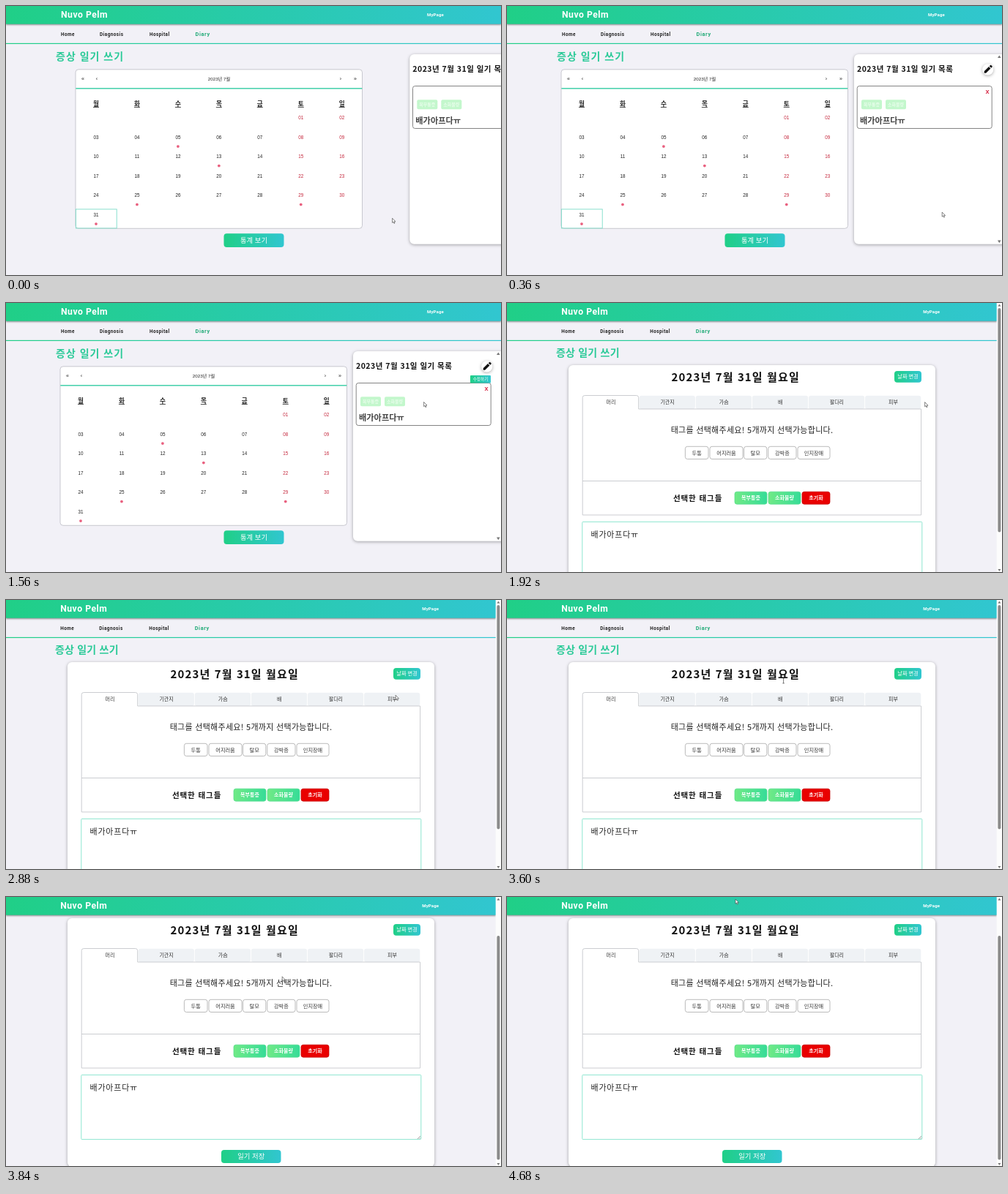
Write an HTML page that moves like this. It is 676 by 368 pixels and loops after 4.8 s.

```html
<!DOCTYPE html>
<html lang="ko">
<head>
<meta charset="utf-8">
<style>
html, body { margin: 0; width: 100%; height: 100%; overflow: hidden; background: #f2f1f7 }
svg { display: block; font-family: "Noto Sans CJK KR", "Noto Sans CJK", sans-serif }
.latin { font-family: Roboto, sans-serif; font-weight: 700 }
.num { font-family: "Liberation Sans", "Noto Sans CJK KR", sans-serif }
.b { font-weight: 700 }
.shadow { filter: drop-shadow(0 1px 2px #0005) }
.bar { filter: drop-shadow(0 1px 1px #0007) }
</style>
</head>
<body>
<svg id="stage" width="676" height="368" viewBox="0 0 676 368"></svg>
<script>
const LOOP = 4800, STEP = 120, SWITCH = 1920;
const $ = id => document.getElementById(id);

const rect = (x, y, w, h, fill, r = 0, more = '') =>
  `<rect x="${x}" y="${y}" width="${w}" height="${h}" rx="${r}" fill="${fill}" ${more}/>`;
const path = (d, more) => `<path d="${d}" ${more}/>`;
const text = (x, y, s, size, fill = '#222', more = '', gap = 0) =>
  `<text x="${x}" y="${y}" font-size="${size}" fill="${fill}" letter-spacing="${gap}" ${more}>${s}</text>`;
const mid = (x, y, s, size, fill, more = '', gap) =>
  text(x, y, s, size, fill, 'text-anchor="middle" ' + more, gap);
const group = (id, body, more = '') => `<g id="${id}" ${more}>${body}</g>`;
const button = (x, y, w, h, s, size, r = 4) =>
  rect(x, y, w, h, 'url(#brand)', r) + mid(x + w / 2, y + h / 2 + size * .36, s, size, '#fff');
const LATIN = 'class="latin"', BOLD = 'class="b"', NUM = 'class="num"';

function header(w, myPage, dx) {
  return rect(0, -4, w, 28.7, 'url(#brand)', 0, 'class="bar"') +
    text(75 + dx, 16, 'Nuvo Pelm', 12.2, '#fff', LATIN, .5) +
    text(myPage, 14.3, 'MyPage', 6, '#fff', LATIN, .15);
}

function nav(w, dx) {
  const items = [['Home', 75], ['Diagnosis', 128], ['Hospital', 196]];
  return items.map(([s, x]) => text(x + dx, 41, s, 6.4, '#222', LATIN, .45)).join('') +
    text(258.5 + dx, 41, 'Diary', 7.4, '#22ab78', LATIN, .6) +
    rect(0, 50.8, w, 1.2, 'url(#brand)');
}

// Drawn at its final place; shifted while the side panel opens.
function calendar() {
  const col = i => 102 + i * 55.95, row = i => 153 + i * 26.5;
  let s = rect(74, 86.8, 391.5, 217.5, '#fff', 4, 'stroke="#bcbcc4" stroke-width=".8"') +
    rect(74.3, 112.1, 391, 1.4, '#35cda4') +
    mid(270, 101.9, '2023년 7월', 6.2, '#222', NUM);
  [['«', 84], ['‹', 103], ['›', 436], ['»', 456]].forEach(([c, x]) => s += mid(x, 101.7, c, 7, '#222', NUM));
  [...'월화수목금토일'].forEach((c, i) => {
    s += mid(col(i), 137.2, c, 8.6, '#222', BOLD) + rect(col(i) - 4, 138.2, 8, .8, '#222');
  });
  for (let d = 1; d <= 31; d++) {
    const i = (d + 4) % 7, r = Math.floor((d + 4) / 7), x = col(i), y = row(r);
    s += mid(x, y + 2.2, String(d).padStart(2, '0'), 6.3, i > 4 ? '#c5283d' : '#222', NUM);
    if ([5, 13, 25, 29, 31].includes(d)) s += `<circle cx="${x}" cy="${y + 12.6}" r="1.9" fill="#e9607f"/>`;
  }
  return s + rect(74.4, 278, 55.8, 26, 'none', 0, 'id="focus" stroke="#7cdcc8" stroke-width=".9"');
}

function panel() {
  const tag = (x, s) => rect(x, 128.3, 28, 13, '#c3f7cc', 2) + mid(x + 14, 137.1, s, 6, '#e9fdec', BOLD);
  return rect(474, 66, 216, 259.8, '#fff', 6, 'class="shadow"') +
    path('M670 71l2.3-3.6 2.3 3.6zM670 320.6l2.3 3.6 2.3-3.6z', 'fill="#777"') +
    text(478, 90.4, '2023년 7월 31일 일기 목록', 10.5, '#111', BOLD, .48) +
    '<circle cx="656.7" cy="86.8" r="7.6" fill="#fff" class="shadow"/>' +
    path('M651.7 91.8v-2.5l6.3-6.3 2.5 2.5-6.3 6.3zM658.8 82.2l1.2-1.2q.6-.5 1.2 0l1.3 1.3q.5.6 0 1.2l-1.2 1.2z', 'fill="#111"') +
    rect(478.2, 109.5, 184, 58, '#fff', 3, 'stroke="#777" stroke-width=".9"') +
    mid(656, 120.2, 'X', 8, '#d8334f', LATIN) +
    tag(484, '복부통증') + tag(517, '소화불량') +
    text(482, 160.8, '배가아프다ㅠ', 11.2, '#444', BOLD) +
    group('edit', button(634, 99, 28, 10.5, '수정하기', 5.6, 1));
}

function form() {
  const line = 'stroke="#c6c8cc" stroke-width=".9"';
  let s = rect(84, 85, 501, 340, '#fff', 6, 'class="shadow"') +
    mid(312.2, 107, '2023년 7월 31일 월요일', 15, '#111', BOLD, 1.13) +
    button(529, 93, 37, 15.7, '날짜 변경', 7.2);
  ['머리', '기관지', '가슴', '배', '팔다리', '피부'].forEach((c, i) => {
    const x = 103 + i * 77.1;
    if (i) s += rect(x + .6, 126.8, 76.2, 18.2, '#eff2f5', 3);
    s += mid(x + 39, 138.3, c, 7, '#333');
  });
  s += path('M103.2 290V129.5q0-3 3-3h70.5q3 0 3 3V145H565.6V290ZM103.2 243.5H565.6', 'fill="none" ' + line) +
    mid(334.5, 178.2, '태그를 선택해주세요! 5개까지 선택가능합니다.', 11, '#222', '', .3);
  [['두통', 243.4, 31.6], ['어지러움', 277, 45], ['탈모', 323.6, 31.2], ['강박증', 356.8, 38.2], ['인지장애', 397, 44]]
    .forEach(([c, x, w]) => s += rect(x, 196.3, w, 17.2, '#fff', 3, 'stroke="#aaa" stroke-width=".8"') +
      mid(x + w / 2, 207.6, c, 7.2, '#333'));
  s += text(227, 270.6, '선택한 태그들', 10.5, '#111', BOLD, .9);
  [['복부통증', 311, 44, 'url(#tag)', '#4fdc8c'], ['소화불량', 357, 44, 'url(#tag)', '#4fdc8c'], ['초기화', 403, 38, '#e90000', '#c40000']]
    .forEach(([c, x, w, f, edge]) => s += rect(x, 258.2, w, 17, f, 3, `stroke="${edge}" stroke-width=".7"`) +
      mid(x + w / 2, 269.3, c, 7, '#fff', BOLD));
  return s + rect(102.8, 299.4, 464, 88.2, '#fff', 1, 'stroke="#8ee6d0" stroke-width="1"') +
    text(114.5, 320.7, '배가아프다ㅠ', 11, '#222', '', .8) +
    path('M562 387l4-4M564.4 387l1.6-1.6', 'stroke="#777" stroke-width=".7"') +
    button(294, 402, 81.5, 18, '일기 저장', 9.4);
}

const heading = (x, y, gap) => text(x, y, '증상 일기 쓰기', 14, '#2bca98', BOLD, gap);

$('stage').innerHTML = `<defs>
  <linearGradient id="brand"><stop stop-color="#20cf87"/><stop offset="1" stop-color="#31c6d0"/></linearGradient>
  <linearGradient id="tag"><stop stop-color="#70ea86"/><stop offset="1" stop-color="#36dc98"/></linearGradient>
</defs>` + rect(0, 0, 676, 368, '#f2f1f7') +
  group('diary', nav(676, 0) + heading(68, 74.4, 1) + group('calendar', calendar()) +
    button(297.5, 311.3, 82, 18.8, '통계 보기', 9.4) + group('panel', panel()) + header(676, 575, 0)) +
  group('editor', group('page', nav(669, -.8) + heading(67, 73, .2) + form()) + header(669, 568.3, -.8) +
    rect(668.7, 0, 7.3, 368, '#fcfcfc') + rect(670.4, 7, 4, 306.5, '#8b8b8b', 2, 'id="thumb"') +
    path('M670.4 4.6l2-3 2 3zM670.4 364l2 3 2-3z', 'fill="#777"')) +
  group('cursor',
    path('M0 0v6.2l1.4-1.2 1 2.2 1-.5-1-2.1h2z', 'id="arrow" fill="#fff" stroke="#444" stroke-width=".65"') +
    path('M-1.3-1h2.6M0-1v7M-1.3 6h2.6', 'id="beam" fill="none" stroke="#444" stroke-width=".7"'));

// Piecewise track: rows of [time, ...values].
function track(keys, t) {
  let i = 0;
  while (i < keys.length - 2 && t >= keys[i + 1][0]) i++;
  const [a, b] = [keys[i], keys[i + 1]];
  const k = Math.min(1, Math.max(0, (t - a[0]) / (b[0] - a[0])));
  return a.slice(1).map((v, j) => v + (b[j + 1] - v) * k);
}

const POINTER = [[0, 527.6, 290.3], [120, 545, 288], [360, 594.2, 282], [720, 596, 262], [1200, 572, 138],
  [1320, 570.6, 135.3], [2760, 570.6, 136], [3360, 378, 107], [3960, 377, 109.3],
  [4200, 336, 353], [4320, 336, 353], [4560, 314, 25], [4680, 312, 3]];
const OPENING = [[0, 1], [120, .3], [240, .05], [360, 0]];
const SCROLL = [[3600, 0], [3720, 40], [3840, 56]];

const show = (id, on) => $(id).setAttribute('display', on ? 'inline' : 'none');
const move = (id, x, y) => $(id).setAttribute('transform', `translate(${x} ${y})`);

function frame(now) {
  const t = Math.floor(now % LOOP / STEP) * STEP;
  const [x, y] = track(POINTER, t), [open] = track(OPENING, t), [scroll] = track(SCROLL, t);
  const onDiary = t < SWITCH, beam = t >= 3360 && t < 3720;
  show('diary', onDiary);
  show('editor', !onDiary);
  move('calendar', 21 * open, 0);
  move('panel', 77.3 * open, 0);
  show('focus', t < 1560);
  show('edit', onDiary && y < 168);
  move('page', 0, -scroll);
  move('thumb', 0, scroll * .82);
  move('cursor', x, y);
  show('arrow', !beam);
  show('beam', beam);
  requestAnimationFrame(frame);
}
requestAnimationFrame(frame);
</script>
</body>
</html>
```
